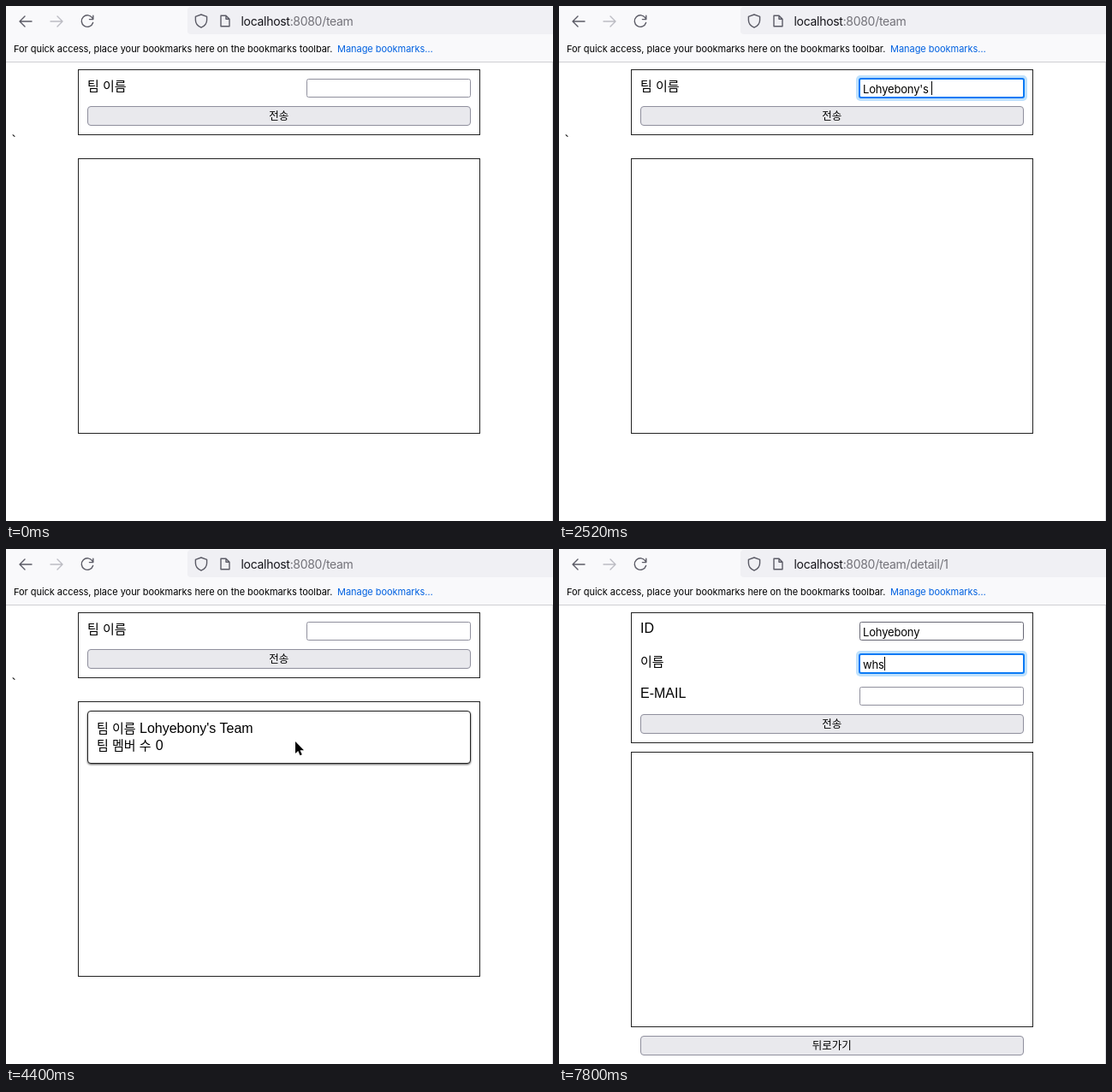
An HTML page that plays this animation: 639 px wide and 602 px high, repeating every 8 s.

```html
<!DOCTYPE html>
<html lang="ko">
<head>
<meta charset="utf-8">
<title>Team form</title>
<style>
html, body { margin: 0; width: 100%; height: 100%; overflow: hidden; background: #fff; }
svg { display: block; width: 639px; height: 602px; }
text { white-space: pre; fill: #000; }
.ui { font-family: Inter, sans-serif; }
.url { font-size: 14px; letter-spacing: -.3px; }
.bar { font-size: 11px; letter-spacing: -.04px; }
.entry { font-size: 13px; letter-spacing: -.17px; }
.latin { font: 16px "Liberation Sans", sans-serif; }
.ko { font: 15px "Liberation Sans", "Noto Sans CJK KR", "Noto Sans CJK", sans-serif; }
.btn { font: 12.5px "Noto Sans CJK KR", "Noto Sans CJK", sans-serif; text-anchor: middle; }
.frame { fill: none; stroke: #222; }
.icon { fill: none; stroke: #5b5b66; stroke-width: 1.4; stroke-linecap: round; stroke-linejoin: round; }
.card { fill: #fff; stroke: #222; filter: drop-shadow(0 1.5px 1px #555); }
</style>
</head>
<body>
<svg id="stage" viewBox="0 0 639 602"></svg>
<script>
const NAME = "Lohyebony";
const LOOP = 8000, STEP = 40;
const CARD_AT = 4080, DETAIL_AT = 5000;

// Markup helpers
const text = (cls, x, y, s, extra = "") => `<text class="${cls}" x="${x}" y="${y}" ${extra}>${s}</text>`;
const frame = (y, h) => `<rect class="frame" x="84.5" y="${y + .5}" width="469" height="${h}"/>`;
const button = (y, label, id = "") =>
  `<rect ${id && `id="${id}"`} x="95.5" y="${y + .5}" width="447" height="22" rx="3.5" fill="#e9e9ed" stroke="#8f8f9d"/>` +
  text("btn", 318.7, y + 15.7, label);
const field = (id, y) => `<g id="${id}" transform="translate(0 ${y})">
  <rect class="edge" x="351.5" y=".5" width="191" height="21" rx="2" fill="#fff" stroke="#8f8f9d"/>
  <g class="ring">
    <rect x="347" y="-4" width="200" height="30" rx="5" fill="#bfe1fc"/>
    <rect x="351" y="0" width="192" height="22" rx="2" fill="#fff" stroke="#0a7af5" stroke-width="2"/>
  </g>
  ${text("ui entry", 355, 16.5, "")}
  <rect class="caret" y="3" width="1" height="16"/>
</g>`;

document.getElementById("stage").innerHTML = `
<rect width="639" height="602" fill="#fff"/>
<rect width="639" height="65" fill="#f9f9fb"/>
<rect y="65" width="639" height="1" fill="#cfcfd3"/>
<rect x="638" y="66" width="1" height="536" fill="#dedee2"/>
<path d="M216 1H639V33H216Q212 33 212 29V5Q212 1 216 1Z" fill="#f0f0f4"/>
<g class="icon">
  <path d="M30 18H16.5M22 12l-6 6 6 6"/>
  <path d="M52 18H65.5M60 12l6 6-6 6" stroke="#bcbcc3"/>
  <path d="M101 14.2A6.8 6.8 0 1 0 101.6 19.5M101.8 11.3V15.6H97.4"/>
  <path d="M228 10l6.6 2.4v4c0 4-2.6 7-6.6 8.8-4-1.8-6.6-4.8-6.6-8.8v-4z"/>
  <path d="M251 11.2h6l4 4v8.6h-10zM257 11.2v4h4"/>
</g>
${text("ui url", 274.5, 23, `<tspan fill="#15141a">localhost</tspan><tspan fill="#737279">:8080/team</tspan><tspan fill="#737279" id="route"></tspan>`)}
${text("ui bar", 9, 54, "For quick access, place your bookmarks here on the bookmarks toolbar.")}
${text("ui bar", 387, 54, "Manage bookmarks…", 'style="fill:#0061e0"')}
<g id="teams">
  ${frame(74, 76)}
  ${text("ko", 95, 99, "팀 이름")}
  ${button(117, "전송", "send")}
  ${text("latin", 6.5, 163, "`")}
  ${frame(178, 321)}
  ${field("team", 85)}
  <g id="card">
    <rect class="card" x="95.5" y="189.5" width="447" height="61" rx="3.5"/>
    ${text("ko", 106, 214.5, "팀 이름")}
    ${text("latin", 156, 215, NAME + "'s Team")}
    ${text("ko", 106, 234.5, "팀 멤버 수")}
    ${text("latin", 174.7, 235, "0")}
  </g>
</g>
<g id="detail">
  ${frame(74, 152)}
  ${text("latin", 95, 98, "ID")}
  ${text("ko", 95, 137, "이름")}
  ${text("latin", 95, 174, "E-MAIL")}
  ${button(193, "전송")}
  ${frame(237, 321)}
  ${button(569, "뒤로가기")}
  ${field("mail", 161)}${field("nick", 123)}${field("userId", 85)}
</g>
<path id="arrow" d="M0 0V14L3.2 11 5.5 16.3 7.8 15.3 5.5 10.2H10Z" stroke="#fff" stroke-width="1.2" paint-order="stroke"/>
<g id="beam" fill="none">
  ${[["#fff", 3], ["#000", 1.1]].map(([c, w]) =>
    `<path d="M-3-6.5Q0-6.5 0-4.5V5Q0 7-3 7M3-6.5Q0-6.5 0-4.5M0 5Q0 7 3 7M-2 2.5H2" stroke="${c}" stroke-width="${w}"/>`).join("")}
</g>`;

const el = id => document.getElementById(id);
const show = (node, on) => node.style.display = on ? "" : "none";
const typed = (s, keys, t) => s.slice(0, keys.filter(k => k <= t).length);
const every = (start, gap, n) => Array.from({ length: n }, (_, i) => start + gap * i);

const TEAM_KEYS = [1040, 1240, ...every(1360, 80, 7), 2120, 2200, 2440, 2560, 2760, 2880, 3040];
const ID_KEYS = [5800, 5920, 6080, 6160, ...every(6280, 80, 3), 6600, 6720];
const NICK_KEYS = [7360, 7720, 7800];

// Pointer paths as [time, x, y]
const PATHS = [
  { end: 1040, points: [[40, 551, 478], [120, 505, 250], [220, 430, 52], [320, 406, 96], [640, 403, 101]] },
  { end: 5800, points: [[3440, 403, 102], [3720, 364, 102], [3880, 338, 130], [4080, 336, 130], [4200, 341, 222],
    [4320, 341, 222], [4400, 338, 225], [4760, 131, 238], [5000, 131, 238], [5080, 316, 212],
    [5360, 420, 104], [5520, 418, 102]] }
];

function pointerAt(t) {
  const path = PATHS.find(p => t >= p.points[0][0] && t < p.end);
  if (!path) return null;
  const pts = path.points;
  const i = pts.findIndex(p => p[0] > t);
  if (i < 0) return pts[pts.length - 1].slice(1);
  const [t0, x0, y0] = pts[i - 1], [t1, x1, y1] = pts[i];
  const u = (t - t0) / (t1 - t0);
  return [x0 + (x1 - x0) * u, y0 + (y1 - y0) * u];
}

function setField(id, value, focused, caret = true, hover = false) {
  const g = el(id), label = g.querySelector("text"), bar = g.querySelector(".caret");
  label.textContent = value;
  show(g.querySelector(".ring"), focused);
  show(bar, focused && caret);
  g.querySelector(".edge").setAttribute("stroke", hover ? "#676774" : "#8f8f9d");
  bar.setAttribute("x", 355 + Math.round(value ? label.getComputedTextLength() : 0));
}

function draw(t) {
  const detail = t >= DETAIL_AT, sent = t >= CARD_AT;
  show(el("teams"), !detail);
  show(el("detail"), detail);
  show(el("card"), sent);
  el("route").textContent = detail ? "/detail/1" : "";

  if (detail) {
    setField("userId", typed(NAME, ID_KEYS, t), t >= 5400 && t < 6960, true, t >= 5400);
    setField("nick", typed("whs", NICK_KEYS, t), t >= 6960);
    setField("mail", "", false);
  } else {
    const value = sent ? "" : typed(NAME + "'s Team", TEAM_KEYS, t);
    setField("team", value, t >= 320 && t < 3960, t < 840 || t >= 1040);
  }

  const pos = pointerAt(t);
  const inside = (x0, y0, x1, y1) => pos && pos[0] >= x0 && pos[0] <= x1 && pos[1] >= y0 && pos[1] <= y1;
  const overField = inside(351, 85, 543, 107);
  const pressed = t >= 3960 && t < CARD_AT;
  el("send").setAttribute("fill", pressed ? "#b1b1b9" : inside(95, 117, 543, 140) ? "#d0d0d7" : "#e9e9ed");
  show(el("arrow"), pos && !overField);
  show(el("beam"), pos && overField);
  if (pos) el(overField ? "beam" : "arrow").setAttribute("transform", `translate(${pos})`);
}

const start = performance.now();
function tick(now) {
  const t = Math.max(0, now - start) % LOOP;
  draw(Math.floor(t / STEP) * STEP);
  requestAnimationFrame(tick);
}
draw(0);
requestAnimationFrame(tick);
</script>
</body>
</html>
```
